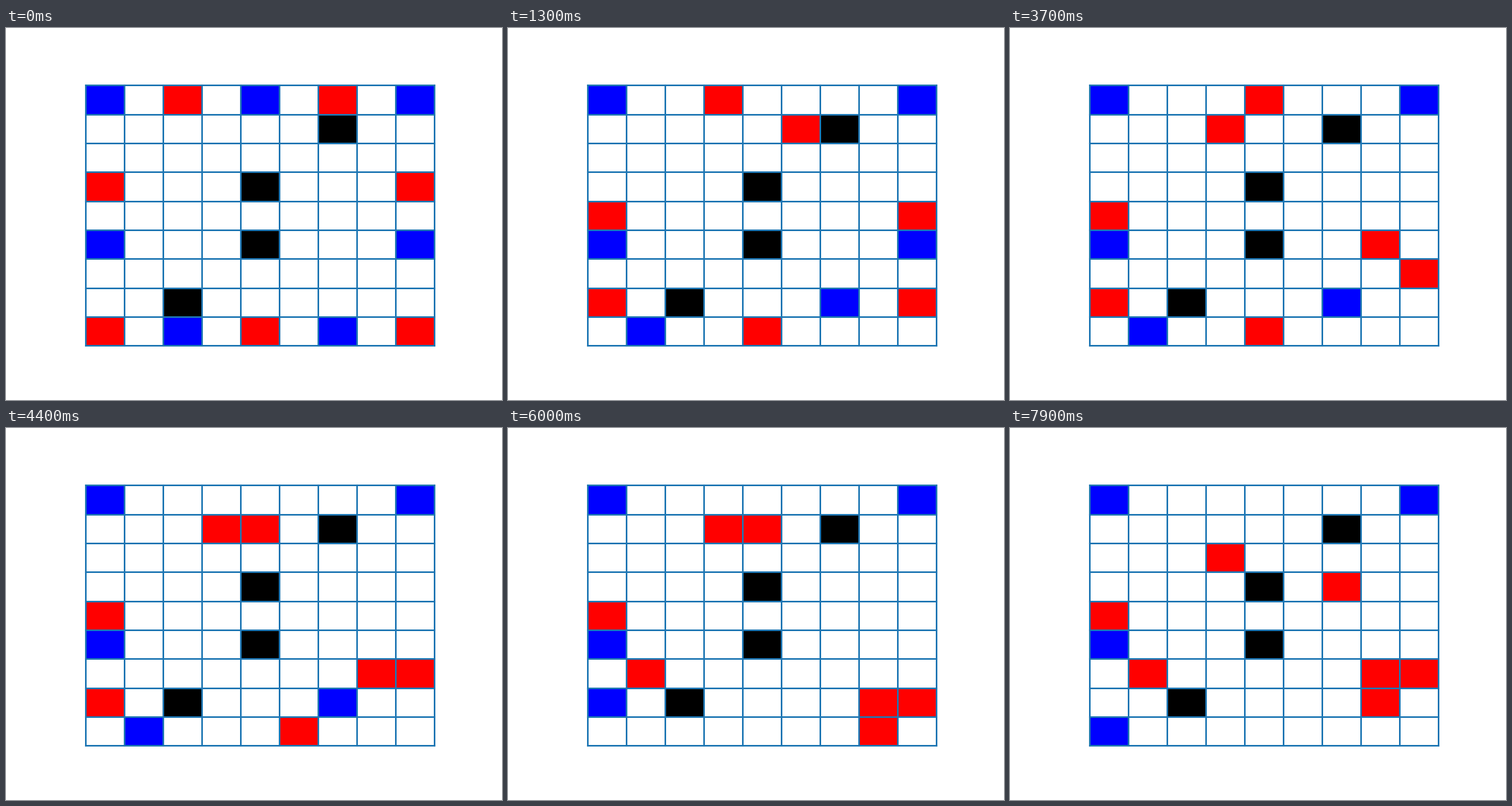
Animation, 640 px wide and 480 px high, one loop 8 s. Source, as a matplotlib script:

```python
import matplotlib.pyplot as plt
from matplotlib.animation import FuncAnimation
from matplotlib.patches import Rectangle

N = 9
FRAMES = 80
COLORS = {"R": "red", "B": "blue", "X": "black"}
STEPS = {"l": (-1, 0), "r": (1, 0), "u": (0, -1), "d": (0, 1)}
CORNERS = [(0, 0), (N - 1, 0), (0, N - 1), (N - 1, N - 1)]

START = {
    "R": "20 60 03 83 08 48 88",
    "B": "00 40 80 05 85 28 68",
    "X": "61 43 45 27",
}

# Each move: column, row, direction; red opens and the sides alternate.
RED = (
    "20r 60l 03d 08u 83d 88u 50d "
    "87u 48r 58l 07d 08u 84d "
    "30r 86d 87u 51l 41l 85l "
    "40d 48r 75d 76d 07r 17u 86d "
    "41r 58r 68r 51l "
    "87u 31d 86d 41r 51d 77u 52d 53r 78u 87u"
).split()
BLUE = (
    ["68u", "28l"]
    + ["18u", "17d"] * 10
    + ["18l", "08u", "07d", "67d", "68r"]
    + ["08u", "07d"] * 6
)


def play(board, move):
    """Return the board after one move, with sandwiched enemies removed."""
    board = dict(board)
    x, y = int(move[0]), int(move[1])
    side = board.pop((x, y))
    dx, dy = STEPS[move[2]]
    x, y = x + dx, y + dy
    board[x, y] = side
    enemy = "B" if side == "R" else "R"
    for dx, dy in STEPS.values():
        near, far = (x + dx, y + dy), (x + 2 * dx, y + 2 * dy)
        hostile = board.get(far) == side or (far in CORNERS and far not in board)
        if board.get(near) == enemy and hostile:
            del board[near]
    return board


boards = [{(int(p[0]), int(p[1])): side
           for side, cells in START.items() for p in cells.split()}]
for i in range(FRAMES - 1):
    boards.append(play(boards[-1], (BLUE if i % 2 else RED)[i // 2]))

fig, ax = plt.subplots(figsize=(6.4, 4.8), dpi=100)
for k in range(N + 1):
    ax.plot([0, N], [k, k], color="C0", lw=1.5)
    ax.plot([k, k], [0, N], color="C0", lw=1.5)
pad = 0.05 * N
ax.set_xlim(-pad, N + pad)
ax.set_ylim(N + pad, -pad)
ax.axis("off")

tiles = {}
for x in range(N):
    for y in range(N):
        tiles[x, y] = ax.add_patch(Rectangle((x, y), 1, 1, lw=0, zorder=1))


def draw(i):
    for cell, tile in tiles.items():
        tile.set_facecolor(COLORS.get(boards[i].get(cell), "white"))
    return list(tiles.values())


anim = FuncAnimation(fig, draw, frames=FRAMES, interval=100, repeat=True)
plt.show()
```
